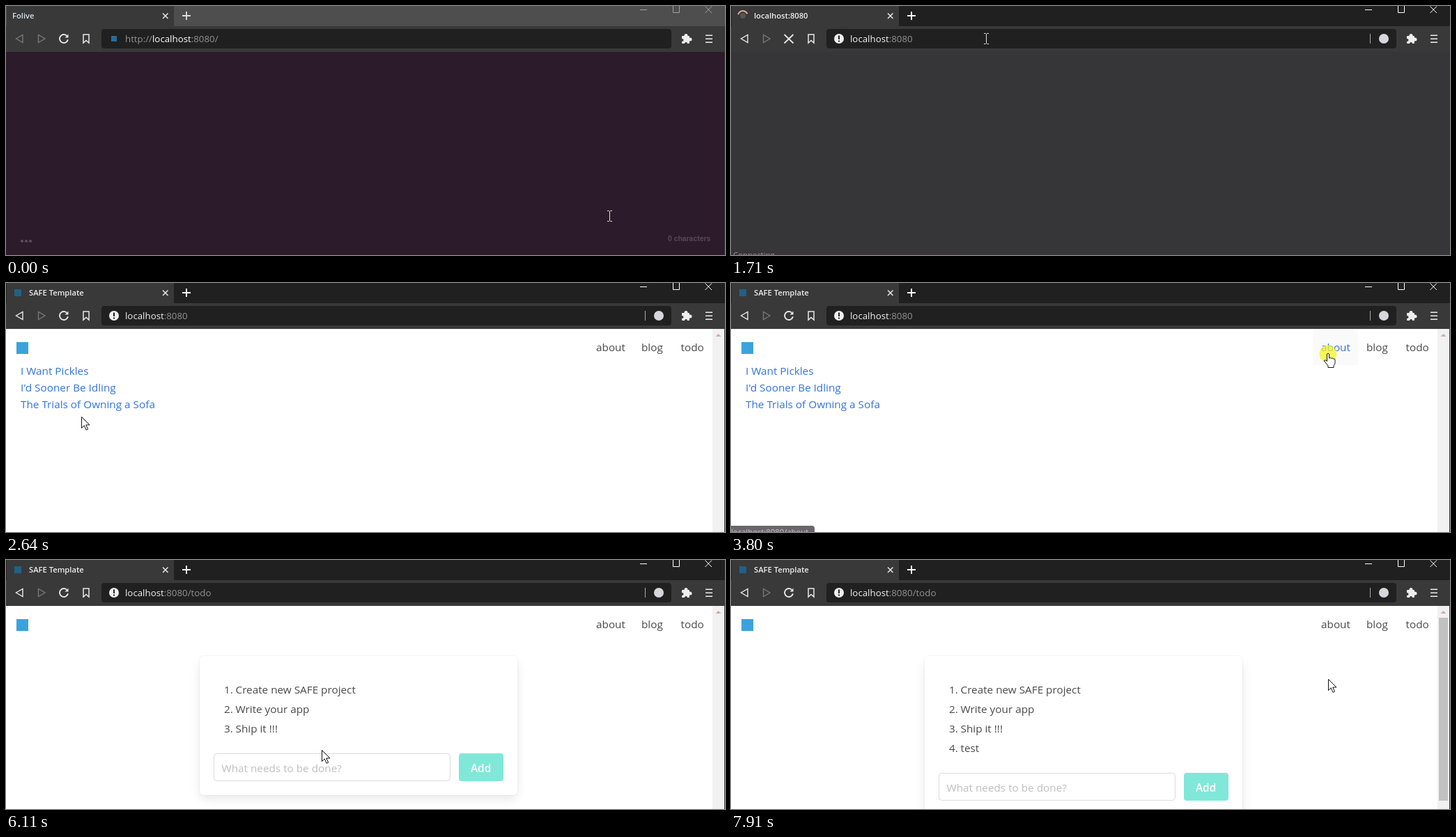
An HTML page with a canvas that plays this animation: 1032 px wide and 358 px high, repeating every 7.99 s.

```html
<!DOCTYPE html>
<html lang="en">
<head>
<meta charset="utf-8">
<title>Browser session</title>
<style>
html, body { margin: 0; width: 100%; height: 100%; overflow: hidden; background: #2c1c2b; }
canvas { display: block; }
</style>
</head>
<body>
<canvas id="stage" width="1032" height="358"></canvas>
<script>
const ctx = document.getElementById('stage').getContext('2d');
const LOOP = 7990;
const UI = '"Open Sans", sans-serif';
const BODY = '15.3px ' + UI, URL_FONT = '13.3px ' + UI, TAB_FONT = '600 11.2px ' + UI;
const LINK = '#3273dc', INK = '#4a4a4a';

// Pointer stops: time, x, y
const stops = [
  [0, 866, 302], [50, 866, 302], [160, 366, 72], [380, 366, 72], [460, 366, 47],
  [2200, 366, 47], [2640, 108, 192], [2980, 108, 192], [3740, 857, 101],
  [4700, 857, 101], [4890, 978, 100], [5040, 978, 100], [5190, 975, 92],
  [5480, 975, 92], [6110, 453, 273], [6200, 452, 283], [6500, 452, 283],
  [6600, 430, 283], [7000, 430, 283], [7190, 708, 298], [7460, 708, 298], [7900, 857, 171]
];
// Pointer shapes, each valid until the given time
const shapes = [[2240, 'beam'], [3680, 'arrow'], [5560, 'hand'], [6150, 'arrow'],
  [7080, 'beam'], [7520, 'hand'], [LOOP, 'arrow']];
const clicks = [[460, 640], [3770, 3920], [5360, 5500], [6750, 6900], [7200, 7380]];
const loads = [[1390, 2160], [3880, 4260], [5420, 5780]];
// Status bubble: from, until, width, text
const bubbles = [[1660, 2300, 339, 'Connecting...'],
  [3730, 4200, 120, 'localhost:8080/about'], [5060, 5640, 114, 'localhost:8080/todo']];

const clamp = v => Math.max(0, Math.min(1, v));
const within = (t, spans) => spans.find(([from, to]) => t >= from && t < to);

function pointerAt(t) {
  const i = stops.findIndex(s => s[0] > t);
  if (i < 0) return stops[stops.length - 1].slice(1);
  const [t0, x0, y0] = stops[i - 1], [t1, x1, y1] = stops[i];
  const u = (t - t0) / (t1 - t0), e = u * u * (3 - 2 * u);
  return [x0 + (x1 - x0) * e, y0 + (y1 - y0) * e];
}

function rect(x, y, w, h, fill, radius = 0) {
  ctx.fillStyle = fill;
  ctx.beginPath();
  ctx.roundRect(x, y, w, h, radius);
  ctx.fill();
}

function outline(x, y, w, h, color, radius = 0, width = 1) {
  ctx.strokeStyle = color;
  ctx.lineWidth = width;
  ctx.beginPath();
  ctx.roundRect(x, y, w, h, radius);
  ctx.stroke();
}

function disc(x, y, r, fill) {
  ctx.fillStyle = fill;
  ctx.beginPath();
  ctx.arc(x, y, r, 0, 7);
  ctx.fill();
}

function arc(x, y, r, from, to, color, width) {
  ctx.strokeStyle = color;
  ctx.lineWidth = width;
  ctx.beginPath();
  ctx.arc(x, y, r, from, to);
  ctx.stroke();
}

function shape(d, stroke, width = 1, fill) {
  const p = new Path2D(d);
  if (fill) { ctx.fillStyle = fill; ctx.fill(p); }
  if (stroke) { ctx.strokeStyle = stroke; ctx.lineWidth = width; ctx.stroke(p); }
}

function text(str, x, y, color, font = BODY) {
  ctx.font = font;
  ctx.fillStyle = color;
  ctx.fillText(str, x, y);
}

function drawSpinner(t) {
  const a = t / 140;
  if (t > 1320 && t < 1860) {
    disc(17, 14, 4, '#555');
    arc(17, 14, 7, -2.9 - (t - 1710) / 300, -0.4 - (t - 1710) / 300, '#e0ac95', 2);
  } else {
    arc(17, 14, 6.5, a, a + 2.9, '#c77f72', 2);
    arc(17, 14, 6.5, a + 3.2, a + 5.9, '#5c8088', 2);
  }
}

function drawBrowser(t) {
  const active = t >= 460, focused = active && t < 1310;
  const visited = t >= 1390, loading = within(t, loads);
  const glyph = '#e8e8e8', frame = active ? '#fff' : '#a0a0a0';

  rect(0, 0, 1032, 29, active ? '#202020' : '#4e4e4e');
  rect(1, 0, 240, 30, '#393939');
  rect(0, 29, 1032, 37, '#393939');

  if (!visited) text('Folive', 9, 18, '#d5e5ea', TAB_FONT);
  else {
    text(t < 2160 ? 'localhost:8080' : 'SAFE Template', 33, 18, '#eee', TAB_FONT);
    if (loading) drawSpinner(t);
    else rect(12, 9, 10, 10, '#1f6287');
  }
  shape('M225 10.5l7.5 7.5m0-7.5l-7.5 7.5', glyph, 1.5);
  shape('M253 14h12m-6-6v12', active ? '#fff' : '#ddd', 1.8);
  shape('M910 5.5h10M957.5-.5h9v10h-9zM1003.5.5l9.5 9.5m0-9.5l-9.5 9.5', frame);

  shape('M24 41.5v11l-9.5-5.5z', visited ? glyph : '#777', 1.4);
  shape('M46.5 41.5v11l9.5-5.5z', '#777', 1.4);
  if (loading) shape('M76.5 41l13 12.5m0-12.5l-13 12.5', glyph, 1.8);
  else {
    arc(83, 47, 6, 0.2, 5.5, glyph, 1.9);
    shape('M84.5 45.5h5v-5z', null, 0, glyph);
  }
  shape('M111 41h8v12l-4-3.5-4 3.5z', glyph, 1.5);

  if (focused) {
    rect(137, 33, 818, 28, '#3b4042', 4);
    outline(137, 33, 818, 28, '#83402f', 4, 2);
    rect(171, 36, 134, 22, '#1758bd');
  } else rect(137, 33, 818, 28, '#202020', 4);

  if (!visited) {
    rect(151, 43, 8, 8, '#276b9b');
    text('http://', 171, 52, focused ? '#fff' : '#929292', URL_FONT);
    let x = 171 + ctx.measureText('http://').width;
    text('localhost', x, 52, '#fff', URL_FONT);
    x += ctx.measureText('localhost').width;
    text(':8080/', x, 52, focused ? '#fff' : '#929292', URL_FONT);
  } else {
    const path = t < 3960 ? '' : t < 5500 ? '/about' : '/todo';
    disc(155, 47, 7, '#f0f0f0');
    rect(154, 42.5, 2, 5.5, '#202020');
    rect(154, 49.5, 2, 2, '#202020');
    text('localhost', 171, 52, '#f2f2f2', URL_FONT);
    text(':8080' + path, 171 + ctx.measureText('localhost').width, 52, '#929292', URL_FONT);
    rect(917, 40, 1, 14, '#aaa');
    disc(937, 47, 7, '#d6d6dc');
  }

  rect(970, 43, 11, 11, '#eee', 1);
  disc(976, 42.5, 2.5, '#eee');
  disc(982, 48, 2.5, '#eee');
  disc(970.5, 49, 2, '#393939');
  disc(976, 54, 2, '#393939');
  for (const y of [41.5, 46.5, 51.5]) rect(1004, y, 10, 1.5, '#eee');
}

function drawNotes() {
  rect(0, 66, 1032, 292, '#2c1c2b');
  for (const x of [23, 29, 35]) disc(x, 338, 2.1, '#5d4f5c');
  text('0 characters', 950, 338, '#5a4858', 'bold 10.4px "Liberation Sans", sans-serif');
}

function drawTodo(t) {
  const added = t >= 7500, shift = added ? 28 : 0;
  const typed = added ? '' : 'test'.slice(0, Math.max(0, Math.floor((t - 6750) / 75)));
  const focused = t >= 6750 && t < 7200, hovered = t >= 6200 && t < 7130;
  const y = 278 + shift;

  ctx.save();
  ctx.shadowColor = 'rgba(10,10,10,.1)';
  ctx.shadowBlur = 15;
  ctx.shadowOffsetY = 7;
  rect(279, 140, 454, 196 + shift, '#fff', 6);
  ctx.restore();
  rect(278, 138, 456, 200 + shift, '#fff', 6);
  outline(277.5, 137.5, 457, 201 + shift, 'rgba(10,10,10,.03)', 6);

  const items = ['Create new SAFE project', 'Write your app', 'Ship it !!!'];
  if (added) items.push('test');
  items.forEach((item, i) => {
    text(i + 1 + '.', 313, 192 + 28 * i, INK);
    text(item, 329.5, 192 + 28 * i, INK);
  });

  if (focused) outline(297, y - 1, 342, 42, 'rgba(50,115,220,.25)', 5, 3);
  outline(298.5, y + .5, 339, 39, focused ? LINK : hovered ? '#b5b5b5' : '#dbdbdb', 4);
  text(typed || 'What needs to be done?', 309.5, y + 27, typed ? '#363636' : '#bfbfbf');
  if (focused) rect(310 + (typed ? ctx.measureText(typed).width : 0), y + 10, 1, 19, '#363636');

  rect(650, y, 64, 40, typed ? '#00d1b2' : '#80e8d9', 4);
  text('Add', 667, y + 27, '#fff', '600 15.3px ' + UI);
}

function drawSite(t) {
  rect(0, 66, 1032, 292, '#fff');
  rect(1014, 66, 17, 292, '#f1f1f1');
  shape('M1018.5 77l4-4 4 4z', null, 0, '#d2ab9c');
  if (t >= 7500) rect(1016, 83, 13, 263, '#c1c1c1');
  if (t < 2160) return;

  rect(15, 85, 17, 17, '#3aa3dc');
  const hover = t >= 3680 && t < 4780 ? 0 : t >= 4780 && t < 4850 ? 1
    : t >= 4850 && t < 5560 ? 2 : -1;
  [['about', 847, 65], ['blog', 912, 56], ['todo', 968.5, 57]].forEach(([name, x, w], i) => {
    if (i === hover) rect(x - 12, 66, w, 52, '#fafafa');
    text(name, x, 98, i === hover ? LINK : INK);
  });

  if (t >= 2240 && t < 4260)
    ['I Want Pickles', "I'd Sooner Be Idling", 'The Trials of Owning a Sofa']
      .forEach((title, i) => text(title, 21, 132 + 24 * i, LINK));
  if (t >= 5780) drawTodo(t);
}

function drawBubble(t) {
  const bubble = within(t, bubbles);
  if (!bubble) return;
  const [from, to, width, label] = bubble;
  ctx.globalAlpha = clamp((t - from) / 95) * clamp((to - t) / 150);
  rect(0, 349, width, 12, '#383539', [0, 4, 0, 0]);
  text(label, label.startsWith('local') ? 0 : 3, 362, '#e6e6e6', '11.3px ' + UI);
  ctx.globalAlpha = 1;
}

function drawPointer(t) {
  const [x, y] = pointerAt(t);
  const kind = shapes.find(([until]) => t < until)[1];
  if (within(t, clicks)) disc(x, y + 1, 12.5, 'rgba(246,244,40,.75)');
  ctx.save();
  ctx.translate(Math.round(x), Math.round(y));
  if (kind === 'beam')
    shape('M-3-7.5h2.5l1 1 1-1h2.5M.5-7v14M-3 7.5h2.5l1-1 1 1h2.5', t < 6000 ? '#e4dfd8' : '#222');
  else if (kind === 'arrow')
    shape('M.5.5v16l3.8-3.6 2.8 6.4 2.5-1.1-2.8-6.2h5.2z', '#111', 1, '#fff');
  else
    shape('M-1.5 1q1.5-2 3 0v6q2-1.3 3 .4 2-1 3 .6 2.5-.6 2.5 1.7v4q0 2-2 4.2v2.6h-8v-2.4q-2-2.8-5.8-7.1 1-2.5 4.3.5z',
      '#111', 1, '#fff');
  ctx.restore();
}

function draw() {
  const t = performance.now() % LOOP;
  if (t < 1390) drawNotes();
  else if (t < 1860) rect(0, 66, 1032, 292, '#363639');
  else drawSite(t);
  rect(1031, 66, 1, 292, '#333');
  drawBrowser(t);
  drawBubble(t);
  drawPointer(t);
  requestAnimationFrame(draw);
}
draw();
</script>
</body>
</html>
```
